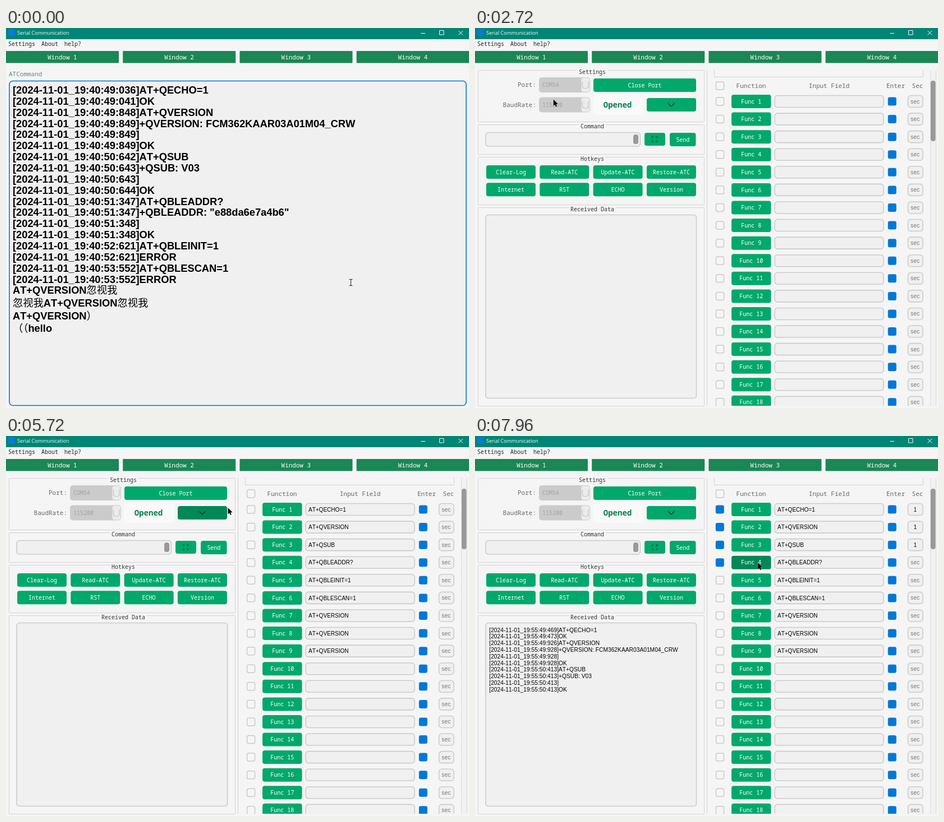
Recreate the animation shown at these times as an HTML page with a canvas. Size 825 px wide and 678 px high, loop 8 s.

```html
<!DOCTYPE html>
<html lang="en">
<head>
<meta charset="utf-8">
<title>Serial Communication</title>
<style>
html, body { margin: 0; height: 100%; overflow: hidden; background: #f5f5f5; }
canvas { display: block; }
</style>
</head>
<body>
<canvas id="stage" width="825" height="678"></canvas>
<script>
const c = document.getElementById('stage').getContext('2d');
const LOOP = 8000, PAGE_SWITCH = 2520, BLUR = 2250, FILL = 4400;
const MONO = '"Noto Sans Mono", "DejaVu Sans Mono", monospace';
const ARIAL = '"Liberation Sans", Arial, sans-serif';
const CJK = '"Noto Sans CJK SC", "Noto Sans CJK", sans-serif';
const GREEN = '#00a86b', BLUE = '#0078d7', LINE = '#cccccc', FIELD = '#f0f0f0', BG = '#f5f5f5';

// Pointer path: time, x, y
const PATH = [
  [0, 614, 454], [320, 614, 454], [1070, 434, 312], [1980, 81, 52], [2520, 81, 52],
  [3000, 236, 251], [3350, 236, 248], [3750, 236, 248], [4150, 165, 252], [5085, 165, 252],
  [5095, 208, 249], [5720, 395.5, 128], [5860, 454, 106], [6050, 484, 128], [6430, 488, 130],
  [6590, 490, 157], [6890, 490, 157], [7220, 495, 190], [7400, 495, 190], [7700, 503, 225], [8000, 504, 226]
];
const CLICKS = [[1980, 2500], [3350, 3420], [4300, 4400], [6320, 6430], [6790, 6890], [7280, 7380], [7770, 7870]];
const RUNS = [6430, 6890, 7380, 7870];

const stamp = (day, rows) => rows.map(r => '[2024-11-01_' + day + r.replace(' ', ']'));
const history = stamp('19:40:', [
  '49:036 AT+QECHO=1', '49:041 OK', '49:848 AT+QVERSION', '49:849 +QVERSION: FCM362KAAR03A01M04_CRW',
  '49:849 ', '49:849 OK', '50:642 AT+QSUB', '50:643 +QSUB: V03', '50:643 ', '50:644 OK',
  '51:347 AT+QBLEADDR?', '51:347 +QBLEADDR: "e88da6e7a4b6"', '51:348 ', '51:348 OK',
  '52:621 AT+QBLEINIT=1', '52:621 ERROR', '53:552 AT+QBLESCAN=1', '53:552 ERROR'
]);
const notes = ['AT+QVERSION忽视我', '忽视我AT+QVERSION忽视我', 'AT+QVERSION）', '（（hello'];
const received = stamp('19:55:', [
  '49:469 AT+QECHO=1', '49:473 OK', '49:926 AT+QVERSION', '49:928 +QVERSION: FCM362KAAR03A01M04_CRW',
  '49:928 ', '49:928 OK', '50:413 AT+QSUB', '50:413 +QSUB: V03', '50:413 ', '50:413 OK'
]);
const receivedCount = [2, 6, 10, 10];
const commands = ['ECHO=1', 'VERSION', 'SUB', 'BLEADDR?', 'BLEINIT=1', 'BLESCAN=1', 'VERSION', 'VERSION', 'VERSION'];

let t = 0, px = 0, py = 0, down = false;

function pointerAt(time) {
  const i = Math.max(1, PATH.findIndex(k => k[0] > time));
  const a = PATH[i - 1], b = PATH[i];
  const u = (time - a[0]) / (b[0] - a[0]), e = u * u * (3 - 2 * u);
  return [a[1] + (b[1] - a[1]) * e, a[2] + (b[2] - a[2]) * e];
}

function text(s, x, base, font, color = '#000', align = 'left') {
  c.font = font;
  c.fillStyle = color;
  c.textAlign = align;
  c.fillText(s, x, base);
}

// Monospaced text centred vertically on y
function mono(s, x, y, size, color, align = 'center', weight = '') {
  text(s, x, Math.round(y + size * .36), `${weight} ${size}px ${MONO}`, color, align);
}

function box(x, y, w, h, r, fill, stroke, lw = 1.6) {
  c.beginPath();
  c.roundRect(x, y, w, h, r);
  if (fill) { c.fillStyle = fill; c.fill(); }
  if (stroke) { c.strokeStyle = stroke; c.lineWidth = lw; c.stroke(); }
}

function lines(color, lw, ...paths) {
  c.strokeStyle = color;
  c.lineWidth = lw;
  c.beginPath();
  for (const p of paths)
    for (let i = 0; i < p.length; i += 2) c[i ? 'lineTo' : 'moveTo'](p[i], p[i + 1]);
  c.stroke();
}

const over = (x, y, w, h) => px > x - 2 && px < x + w + 2 && py > y - 2 && py < y + h + 2;

function button(x, y, w, h, label) {
  box(x, y, w, h, 4, !over(x, y, w, h) ? GREEN : down ? '#006d43' : '#008857');
  if (label) mono(label, x + w / 2, y + h / 2, 10, '#fff');
}

function group(title, top, bottom) {
  box(5.5, top + .5, 403, bottom - top, 1, null, '#d2d2d2', 1);
  const w = title.length * 6 + 6;
  c.fillStyle = BG;
  c.fillRect(209 - w / 2, top - 1, w, 3);
  mono(title, 209, top + 3, 10, '#333');
}

function frame() {
  c.fillStyle = BG;
  c.fillRect(0, 0, 825, 678);
  c.fillStyle = '#018574';
  c.fillRect(0, 0, 825, 20);
  box(4, 2, 12, 12, 1, '#0a7ad8');
  text('Serial Communication', 20, 12, '9px "Open Sans", "Noto Sans", sans-serif', '#fff');
  lines('#fff', 1, [739.5, 9.5, 747, 9.5], [806.5, 5, 814, 12.5], [814, 5, 806.5, 12.5]);
  box(772.5, 4.5, 7.5, 7.5, 0, null, '#fff', 1);
  mono('Settings', 4, 28, 10, '#222', 'left');
  mono('About', 63, 28, 10, '#222', 'left');
  mono('help?', 104, 28, 10, '#222', 'left');
  for (let i = 0; i < 4; i++) {
    const x = i * 208.2, hot = over(x, 41, 201, 21);
    box(x, 41, 201, 21.5, 1, !hot ? '#1b8755' : t < BLUR ? '#157347' : '#0f6e40');
    mono('Window ' + (i + 1), x + 100.3, 52, 11, '#fff');
  }
}

function mixed(s, x, base) {
  for (const run of s.match(/[\x00-\xff]+|[^\x00-\xff]+/g)) {
    text(run, x, base, run < '\xff' ? `bold 18.3px ${ARIAL}` : `18.3px ${CJK}`);
    x += c.measureText(run).width;
  }
}

function notesPage() {
  mono('ATCommand', 5, 82.5, 11, '#5f8b73', 'left');
  const focus = t < BLUR;
  box(6, 94.5, 814, 579, 6, FIELD, focus ? BLUE : LINE);
  history.forEach((s, i) => mixed(s, 12, 117 + i * 19.86));
  notes.forEach((s, i) => mixed(s, 12, 474 + i * 22.8));
  if (focus && t >= 390 && Math.floor((t - 390) / 530) % 2 === 0) {
    c.fillStyle = '#000';
    c.fillRect(197, 458, 1, 20);
  }
}

function combo(y, label, value) {
  mono(label, 109, y, 11, '#666', 'right');
  box(114, y - 13.5, 91, 27, 5, '#cbcbcb');
  box(189.5, y - 12.5, 14.5, 25, 4, '#ececec');
  lines('#c4c4c4', 1.2, [191.5, y - 6, 191.5, y + 4, 193.5, y + 6, 200, y + 6, 202, y + 4, 202, y - 6]);
  mono(value, 120, y, 10, '#a2a2a2', 'left');
}

function leftPane() {
  group('Settings', 75, 167);
  combo(101.5, 'Port:', 'COM54');
  combo(137, 'BaudRate:', '115200');
  button(211, 90, 183, 24, 'Close Port');
  box(211, 121, 88, 33, 5, '#f8f9f9', '#fafafa', 1);
  mono('Opened', 254, 137, 14, '#0c7d51', 'center', 'bold');
  button(306, 125, 88, 24);
  lines('#12301f', 1.3, [343.5, 134, 349.5, 140, 355.5, 134]);

  group('Command', 172, 225);
  box(19, 186.5, 275.5, 24.5, 5, FIELD, LINE);
  box(282, 190, 9, 17, 4, '#999');
  button(302, 187, 37, 23);
  lines('#0b5a3a', 1.4, [315.5, 197, 315.5, 194.5, 318, 194.5], [322, 194.5, 324.5, 194.5, 324.5, 197],
    [324.5, 200.5, 324.5, 203, 322, 203], [318, 203, 315.5, 203, 315.5, 200.5]);
  button(347, 187, 46.5, 24, 'Send');

  group('Hotkeys', 230, 315);
  ['Clear-Log', 'Read-ATC', 'Update-ATC', 'Restore-ATC', 'Internet', 'RST', 'ECHO', 'Version']
    .forEach((s, i) => button(20 + i % 4 * 95.3, i < 4 ? 245 : 276.3, 88, 24, s));

  group('Received Data', 320, 674);
  box(19, 333.5, 375.5, 327, 5, FIELD, LINE);
  const done = RUNS.filter(r => t >= r + 45).length;
  received.slice(0, done ? receivedCount[done - 1] : 0)
    .forEach((s, i) => text(s, 25.3, 349.7 + i * 11.77, `10.25px ${ARIAL}`));
}

function check(x, y, on) {
  if (on) box(x - .7, y - 7.5, 15, 15, 3, BLUE);
  else box(x, y - 7, 14, 14, 3, '#f6f6f6', '#cacaca', 1.5);
}

function rightPane() {
  lines('#d2d2d2', 1, [413.5, 75, 413.5, 674], [426.5, 75, 426.5, 87.5, 798.5, 87.5, 798.5, 75]);
  check(429.5, 103, false);
  mono('Function', 492, 103, 11, '#666');
  mono('Input Field', 631, 103, 11, '#666');
  mono('Enter', 749.5, 103, 11, '#666');
  mono('Sec', 788.5, 103.5, 11, '#666');

  c.save();
  c.beginPath();
  c.rect(414, 75, 396, 599);
  c.clip();
  for (let i = 0; i < 18; i++) {
    const y = 131 + i * 31.58;
    check(429.5, y, t >= RUNS[i]);
    button(457, y - 12, 70.5, 24, 'Func ' + (i + 1));
    box(534, y - 10.5, 194, 21, 5, FIELD, LINE);
    if (t >= FILL && commands[i]) text('AT+Q' + commands[i], 539, y + 3.7, `10px ${ARIAL}`);
    check(736.5, y, true);
    box(771.5, y - 10.5, 26.5, 21, 5, FIELD, LINE);
    const timed = i < 3 && t >= RUNS[i + 1];
    text(timed ? '1' : 'sec', 784.3, y + 3.5, `10.2px ${ARIAL}`, timed ? '#111' : '#777', 'center');
  }
  c.restore();

  c.fillStyle = '#f1f1f1';
  c.fillRect(811, 75, 10, 599);
  lines('#dadada', 1, [811.5, 75, 811.5, 674], [821.5, 75, 821.5, 674]);
  box(812, 94, 8.5, 108, 4, '#999');
}

function pointer() {
  if (down) {
    c.fillStyle = 'rgba(220,215,10,.65)';
    c.beginPath();
    c.arc(px - .5, py - .5, 9.5, 0, 7);
    c.fill();
  }
  if (t < PAGE_SWITCH && py > 94) {
    const x = Math.round(px) + .5, y = Math.round(py);
    lines('#222', 1, [x - 3, y - 5.5, x + 3, y - 5.5], [x - 3, y + 5.5, x + 3, y + 5.5], [x, y - 5, x, y + 5]);
    return;
  }
  c.beginPath();
  [0, 0, 0, 11.5, 2.6, 9.2, 4.4, 13, 6.2, 12.2, 4.5, 8.4, 8, 8.2]
    .forEach((v, i, a) => i % 2 || c.lineTo(px + v, py + a[i + 1]));
  c.closePath();
  c.strokeStyle = 'rgba(255,255,255,.5)';
  c.lineWidth = 1;
  c.stroke();
  c.fillStyle = '#000';
  c.fill();
}

function draw() {
  t = performance.now() % LOOP;
  [px, py] = pointerAt(t);
  down = CLICKS.some(([a, b]) => t >= a && t < b);
  c.fontKerning = 'none';
  frame();
  if (t < PAGE_SWITCH) notesPage();
  else { leftPane(); rightPane(); }
  pointer();
  requestAnimationFrame(draw);
}
draw();
</script>
</body>
</html>
```
